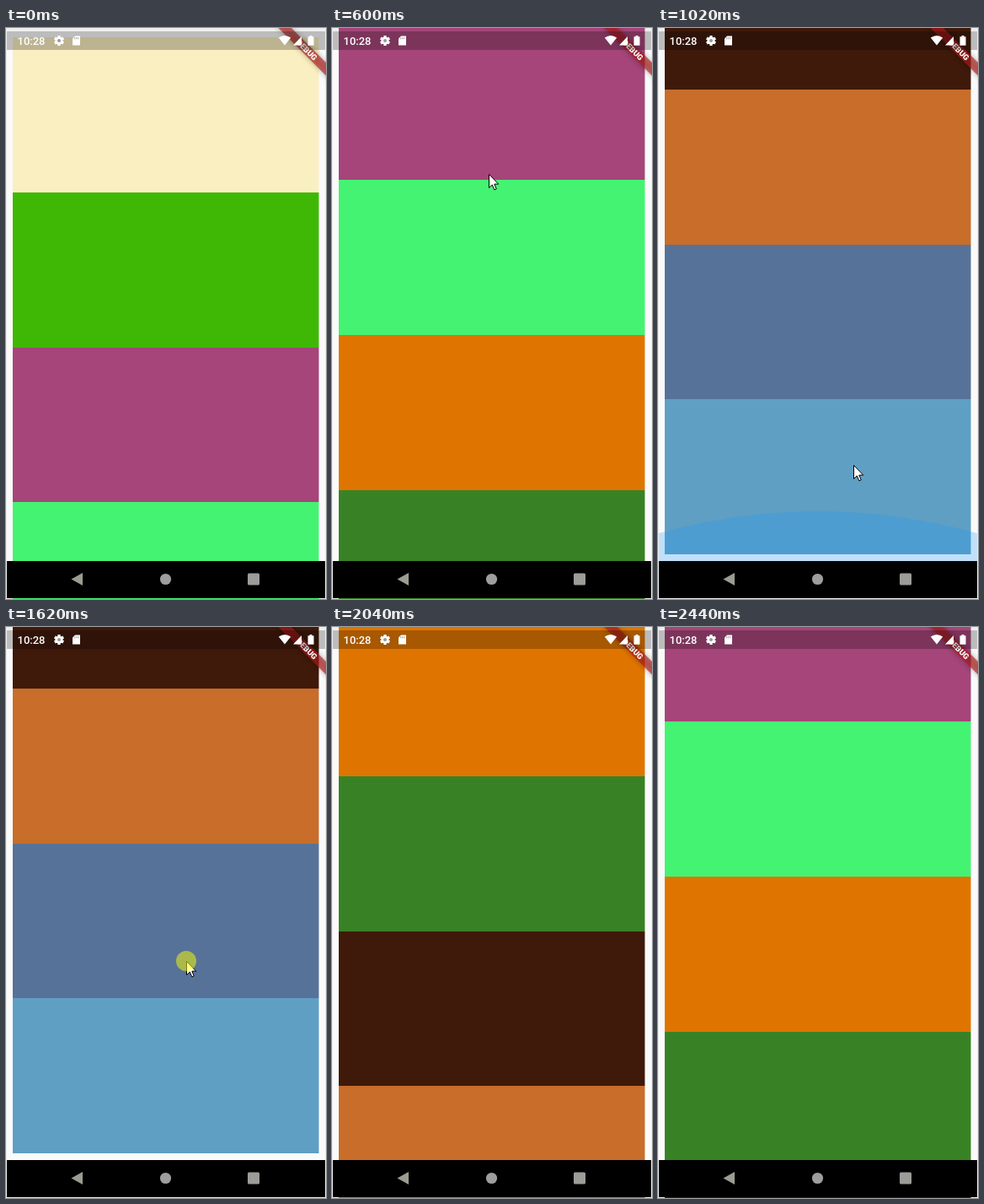
These frames come from a looping animation (380x677 px, 2.64 s). An HTML page with a canvas:

```html
<!DOCTYPE html>
<html lang="en">
<head>
<meta charset="utf-8">
<title>Scrolling colour list</title>
<style>
  html, body { margin: 0; width: 100%; height: 100%; overflow: hidden; background: #fff; }
  canvas { display: block; }
</style>
</head>
<body>
<canvas id="stage" width="380" height="677"></canvas>
<script>
const c = document.getElementById('stage').getContext('2d');
const LOOP = 2640, TOP = 11.4, PITCH = 183.65;
const colors = ['#faefc1', '#3fb805', '#a54579', '#44f372', '#df7500',
                '#388225', '#3f190a', '#c86d2a', '#577298', '#5f9fc4'];

const poses = [
  { t: 0, scroll: 0 },
  { t: 200, scroll: 0, cursor: [261, 494] },
  { t: 400, scroll: 1, cursor: [188, 530], press: true },
  { t: 600, scroll: 382, cursor: [186, 173] },
  { t: 820, scroll: 1028, cursor: [186, 414] },
  { t: 1020, scroll: 1224, cursor: [232, 518], glow: true },
  { t: 1220, scroll: 1224, cursor: [232, 519] },
  { t: 1420, scroll: 1224, cursor: [227, 448] },
  { t: 1620, scroll: 1224, cursor: [214, 396], press: true },
  { t: 1820, scroll: 1050, cursor: [216, 560] },
  { t: 2040, scroll: 752.6 },
  { t: 2240, scroll: 570 },
  { t: 2440, scroll: 450 }
];

function rect(x, y, w, h, fill) {
  c.fillStyle = fill;
  c.fillRect(x, y, w, h);
}

function poly(points, fill) {
  c.beginPath();
  points.forEach(([x, y]) => c.lineTo(x, y));
  c.closePath();
  c.fillStyle = fill;
  c.fill();
}

function disc(x, y, r, fill) {
  c.beginPath();
  c.arc(x, y, r, 0, 2 * Math.PI);
  c.fillStyle = fill;
  c.fill();
}

function list(scroll) {
  colors.forEach((color, i) => {
    const y = Math.round(TOP + i * PITCH - scroll);
    const end = Math.round(TOP + (i + 1) * PITCH - scroll);
    rect(8, y, 363.5, end - y, color);
  });
}

function banner() {
  c.save();
  c.translate(379.5, 4);
  c.rotate(Math.PI / 4);
  c.shadowColor = 'rgba(0,0,0,.5)';
  c.shadowBlur = 6;
  rect(-45, 25.8, 90, 11, 'rgba(183,28,28,.63)');
  c.shadowColor = 'transparent';
  c.font = '900 9.4px Roboto, sans-serif';
  c.textAlign = 'center';
  c.fillStyle = '#fff';
  c.fillText('DEBUG', 0, 34.7);
  c.restore();
}

function gear(x, y) {
  c.save();
  c.translate(x, y);
  c.fillStyle = '#fff';
  for (let i = 0; i < 3; i++) {
    c.fillRect(-1.6, -6, 3.2, 12);
    c.rotate(Math.PI / 3);
  }
  c.beginPath();
  c.arc(0, 0, 4.6, 0, 7);
  c.fill();
  c.restore();
  disc(x, y, 2, 'rgba(0,0,0,.4)');
}

function statusBar() {
  rect(1, 4, 378, 22, 'rgba(0,0,0,.25)');
  c.font = '500 13px Roboto, sans-serif';
  c.fillStyle = '#fff';
  c.fillText('10:28', 13.5, 20);
  gear(63, 15);
  poly([[82, 9.5], [88, 9.5], [88, 20.5], [79, 20.5], [79, 12.5]], '#fff');
  [81.2, 83.2, 85.2].forEach(x => rect(x, 11, 1, 2.3, 'rgba(0,0,0,.35)'));
  c.beginPath();
  c.moveTo(331, 20.5);
  c.lineTo(323.8, 11.5);
  c.quadraticCurveTo(331, 6.5, 338.2, 11.5);
  c.fillStyle = '#fff';
  c.fill();
  poly([[341, 20.5], [351, 10], [351, 20.5]], '#fff');
  rect(358.5, 10.3, 7, 10.4, '#fff');
  rect(360.5, 9, 3, 1.5, '#fff');
}

function navBar() {
  rect(1, 632, 378, 44, '#000');
  poly([[77.5, 653.5], [91, 646], [91, 661]], '#9c9c92');
  disc(189.5, 653.5, 6.6, '#9e9e9e');
  c.beginPath();
  c.roundRect(287, 646.5, 14, 14, 1.5);
  c.fillStyle = '#9c9c98';
  c.fill();
}

function glow() {
  c.save();
  c.beginPath();
  c.rect(1, 4, 378, 628);
  c.clip();
  disc(190, 1273, 700, 'rgba(33,150,243,.27)');
  c.restore();
}

function pointer(x, y, press) {
  c.save();
  c.translate(x + .5, y + .5);
  poly([[0, 0], [0, 16], [3.8, 12.5], [6.3, 18.3], [8.7, 17.3], [6.3, 11.6], [11.2, 11.6]], '#fff');
  c.lineWidth = 1;
  c.strokeStyle = '#000';
  c.stroke();
  c.restore();
  if (press) disc(x, y, 12, 'rgba(255,255,0,.5)');
}

function draw(now) {
  const t = now % LOOP;
  const pose = poses.findLast(p => p.t <= t);
  rect(0, 0, 380, 677, '#eee');
  rect(1, 4, 378, 628, '#fafafa');
  list(pose.scroll);
  if (pose.glow) glow();
  banner();
  statusBar();
  navBar();
  if (pose.cursor) pointer(...pose.cursor, pose.press);
}

const start = performance.now();
function tick() {
  draw(performance.now() - start);
  requestAnimationFrame(tick);
}
tick();
</script>
</body>
</html>
```
